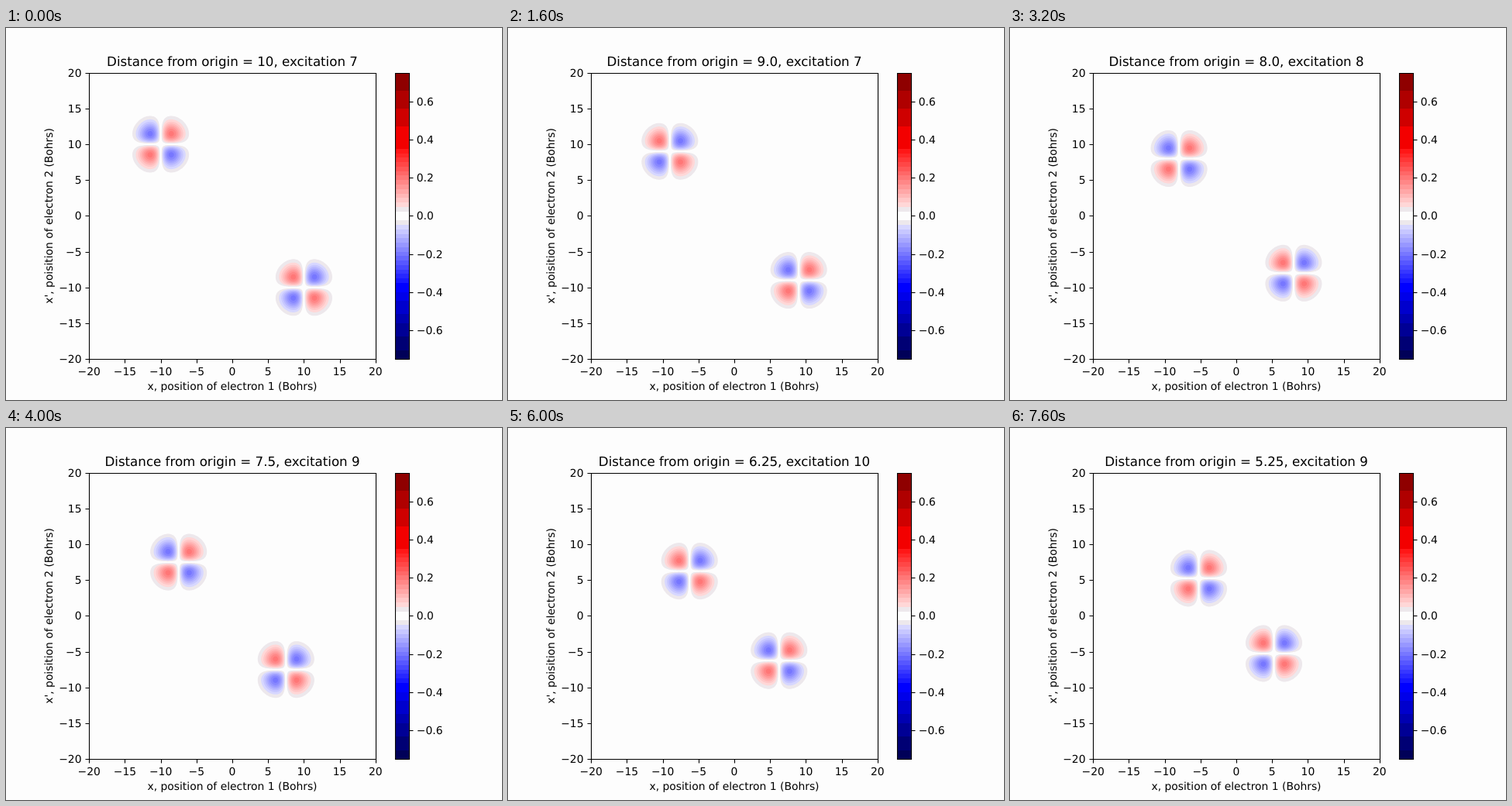
These frames come from a looping animation (640x480 px, 8000 ms). An HTML page:

```html
<!DOCTYPE html>
<html lang="en">
<head>
<meta charset="utf-8">
<title>Excitation plot</title>
<style>
  html, body { margin: 0; width: 100%; height: 100%; overflow: hidden; background: #fdfdfd; }
  svg { display: block; width: 640px; height: 480px; }
  text { font: 13.89px "DejaVu Sans", sans-serif; fill: #000; text-rendering: geometricPrecision; }
  #title { font-size: 16.67px; }
  .line { fill: none; stroke: #000; stroke-width: 1.1; }
</style>
</head>
<body>
<svg id="plot" viewBox="0 0 640 480"></svg>
<script>
const NS = 'http://www.w3.org/2000/svg';
const svg = document.getElementById('plot');
const UNIT = 9.24, CX = 292, CY = 242.4, TOP = 57.6, BOTTOM = 427.2;
const SIGMA = 13.55;          // lobe peak offset in pixels
const PEAK = 0.2;             // largest amplitude
const STEP = 1.5 / 64;        // contour spacing
const BAND = (BOTTOM - TOP) / 64;
const FRAME_MS = 400, FRAMES = 20;

function add(parent, tag, attrs, text) {
  const el = document.createElementNS(NS, tag);
  for (const key in attrs) el.setAttribute(key, attrs[key]);
  if (text !== undefined) el.textContent = text;
  parent.appendChild(el);
  return el;
}
const label = (x, y, anchor, text, extra) =>
  add(svg, 'text', { x, y, 'text-anchor': anchor, ...extra }, text);
const line = d => add(svg, 'path', { d, class: 'line' });
const signed = (v, digits) => (v < 0 ? '\u2212' : '') + Math.abs(v).toFixed(digits);

// Colour of the n-th band away from zero
function tint(n, positive) {
  if (n === 1) return '#ede8ec';
  const c = Math.max(0, Math.round(255 - (n + 0.5) * 16));
  return positive ? `rgb(255,${c},${c})` : `rgb(${c},${c},255)`;
}

// Contour of u·v·exp(1 - (u² + v²)/2) = level, traced by rays from its peak
function contour(level) {
  const f = x => Math.log(x) - x * x / 2;
  const goal = Math.log(level) - 1;
  const points = [];
  for (let i = 0; i < 120; i++) {
    const a = i / 120 * 2 * Math.PI, c = Math.cos(a), s = Math.sin(a);
    let lo = 0, hi = 4;
    for (let k = 0; k < 30; k++) {
      const r = (lo + hi) / 2;
      if (f(1 + r * c) + f(1 + r * s) >= goal) lo = r; else hi = r;
    }
    points.push(((1 + lo * c) * SIGMA).toFixed(2) + ' ' + ((1 + lo * s) * SIGMA).toFixed(2));
  }
  return 'M' + points.join('L') + 'Z';
}

function makeCluster(paths) {
  const g = add(svg, 'g', {});
  for (const [sx, sy] of [[1, 1], [1, -1], [-1, 1], [-1, -1]]) {
    const lobe = add(g, 'g', { transform: `scale(${sx} ${sy})` });
    paths.forEach((d, i) => add(lobe, 'path', { d, fill: tint(i + 1, sx * sy < 0) }));
  }
  return g;
}

function drawColorbar() {
  const bar = (from, to, fill) => add(svg, 'rect', {
    x: 502, y: TOP + from * BAND, width: 18.5, height: (to - from) * BAND + 0.2, fill
  });
  const g = add(svg, 'g', { 'shape-rendering': 'crispEdges' });
  const place = (from, to, fill) => g.appendChild(bar(from, to, fill));
  const reds = [0, 4, 8, 12, 17], blues = [0, 2, 5, 8, 10, 13, 15, 17];
  for (let i = 1; i < reds.length; i++) {
    const mid = (reds[i - 1] + reds[i]) / 2;
    place(reds[i - 1], reds[i], `rgb(${Math.round(255 * (0.5 + mid / 32))},0,0)`);
  }
  for (let n = 14; n >= 1; n--) place(31 - n, 32 - n, tint(n, true));
  place(31, 33, '#fdfdfd');
  for (let n = 1; n <= 14; n++) place(32 + n, 33 + n, tint(n, false));
  for (let i = blues.length - 1; i > 0; i--) {
    const mid = (blues[i - 1] + blues[i]) / 2;
    place(64 - blues[i], 64 - blues[i - 1], `rgb(0,0,${Math.round(255 * Math.min(1, 0.3 + 0.7 * mid / 16))})`);
  }
  line('M502.5 58.5H520.5V427.5H502.5Z');
  for (let i = -3; i <= 3; i++) {
    const y = Math.round(CY - i * 0.2 * (BOTTOM - TOP) / 1.5);
    line(`M520.5 ${y + 0.5}h5`);
    label(529.8, y + 5, 'start', signed(i * 0.2, 1));
  }
}

function drawAxes() {
  line('M107.5 58.5H477.5V427.5H107.5Z');
  for (let v = -20; v <= 20; v += 5) {
    const x = CX + v * UNIT, y = Math.round(CY - v * UNIT);
    line(`M${Math.round(x) + 0.5} 427.5v5M107.5 ${y + 0.5}h-5`);
    label(x, 448, 'middle', signed(v, 0));
    label(97.5, y + 5, 'end', signed(v, 0));
  }
  label(CX, 467, 'middle', 'x, position of electron 1 (Bohrs)');
  label(0, 0, 'middle', "x', poisition of electron 2 (Bohrs)",
    { transform: `translate(59.5 ${CY}) rotate(-90)` });
}

const paths = [];
for (let n = 1; n * STEP < PEAK; n++) paths.push(contour(n * STEP / PEAK));
const upper = makeCluster(paths), lower = makeCluster(paths);
drawColorbar();
drawAxes();
const title = label(CX, 49, 'middle', '', { id: 'title' });

function excitation(k) {
  if (k < 8) return 7;
  if (k === 8) return 8;
  return k >= 14 && k < 18 ? 10 : 9;
}
// The sign of the wave function changes at these steps
const phase = k => [2, 5, 12, 18].filter(s => k >= s).length % 2 ? -1 : 1;

function distanceText(d) {
  if (d === 10) return '10';
  return Number.isInteger(d) ? d.toFixed(1) : String(d);
}

let shown = -1;
function render(ms) {
  const k = Math.floor(ms / FRAME_MS) % FRAMES;
  if (k === shown) return;
  shown = k;
  const d = 10 - k * 0.25, r = d * UNIT, sign = phase(k);
  upper.setAttribute('transform', `translate(${CX - r} ${CY - r}) scale(${sign} 1)`);
  lower.setAttribute('transform', `translate(${CX + r} ${CY + r}) scale(${-sign} 1)`);
  title.textContent = `Distance from origin = ${distanceText(d)}, excitation ${excitation(k)}`;
}

const start = performance.now();
function tick() {
  render(performance.now() - start);
  requestAnimationFrame(tick);
}
tick();
</script>
</body>
</html>
```
